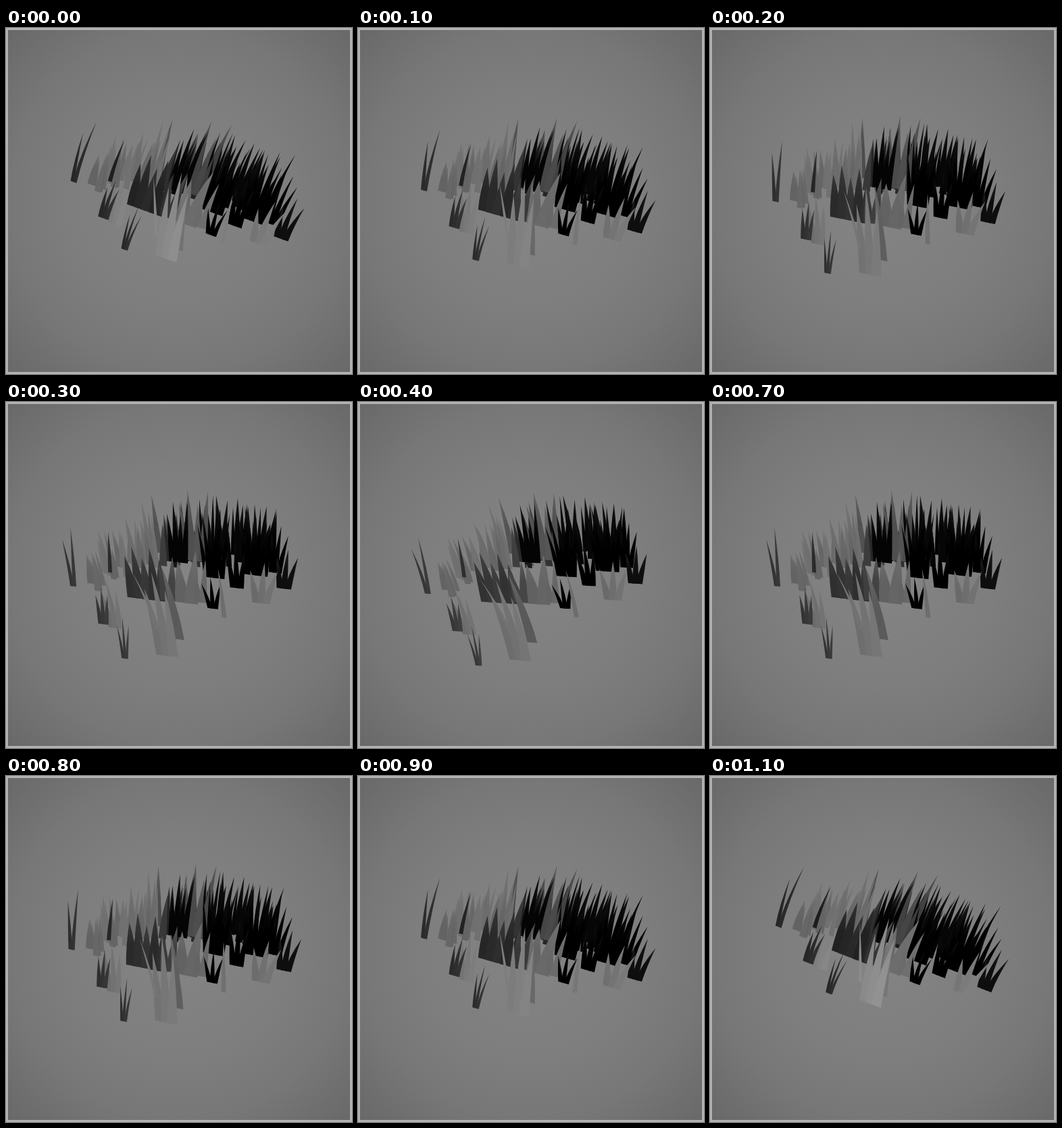
Recreate the animation shown at these times as an HTML page with a canvas. Size 512 by 512 pixels, loop 1220 ms.

```html
<!DOCTYPE html>
<html lang="en">
<head>
<meta charset="utf-8">
<title>Swaying grass</title>
<style>
html, body { margin: 0; width: 100%; height: 100%; overflow: hidden; background: #767676; }
canvas { display: block; width: 100vw; height: 100vh; }
</style>
</head>
<body>
<canvas id="stage" width="512" height="512"></canvas>
<script>
const ctx = document.getElementById('stage').getContext('2d');
const LOOP = 1220, STEP = 100, STEPS = 12;
const PIVOT = { x: 304, y: 308 };
const blades = [];

const clamp = (v, lo, hi) => Math.max(lo, Math.min(hi, v));
const mix = (a, b, t) => a + (b - a) * t;
const gray = v => { v = clamp(Math.round(v), 0, 255); return `rgb(${v},${v},${v})`; };

let seed = 4127;
const rnd = (lo = 0, hi = 1) => {
  seed = (seed * 16807) % 2147483647;
  return lo + (hi - lo) * seed / 2147483647;
};

// A fan of blades on a slightly sloping root; every second blade is tall
function clump(shade, x, y, w, h, n = 1, spread = 0, lean = 0) {
  for (let i = 0; i < n; i++) {
    const t = n > 1 ? 2 * i / (n - 1) - 1 : 0;
    const offset = t * w * 0.5 * (1 - 1 / n);
    blades.push({
      x: x + offset,
      y: y + offset * 0.2,
      w: n > 1 ? w / n * 1.6 : w,
      h: h * (n === 1 || i % 2 ? 1 : 0.8),
      lean: lean + t * spread,
      shade: shade + (shade > 15 ? (i % 3) * 4 : 0)
    });
  }
}

// Rear rows: pale on the left, mixed in the middle, black on the right
function meadow() {
  const rows = [];
  for (let i = 0; i < 64; i++) {
    const s = (i * 0.618) % 1;
    const x = mix(124, 396, s);
    const pale = rnd(98, 114);
    const shade = s < 0.36 ? pale : s < 0.6 ? rnd(0, 82) : rnd(0, 8);
    const y = 244 + 34 * (1 - s / 0.25) * (s < 0.25) + 20 * Math.max(0, s - 0.4) - rnd(0, 26);
    const h = (62 + 38 * Math.sin(Math.PI * Math.min(1, s * 0.9))) * rnd(0.55, 1);
    rows.push([shade, x, y, rnd(6, 13), h, 1, 0, mix(-0.04, 0.2, s) + rnd(-0.08, 0.08)]);
  }
  rows.sort((a, b) => a[2] - b[2]).forEach(r => clump(...r));
}

meadow();
clump(70, 278, 238, 32, 108, 4, 0.1, 0.1);
clump(4, 254, 238, 24, 92, 4, 0.08, 0.1);
clump(0, 307, 264, 28, 100, 6, 0.14, 0.1);
clump(0, 369, 266, 32, 104, 6, 0.15, 0.13);
clump(0, 398, 265, 16, 72, 3, 0.12, 0.24);
clump(0, 341, 281, 17, 70, 3, 0.14, 0.08);
clump(42, 208, 285, 54, 80, 5, 0.06, 0);
clump(58, 239, 289, 18, 68, 2, 0.1, 0.05);
clump(98, 266, 295, 26, 80, 2, 0.1, 0.12);
clump(100, 287, 296, 14, 66, 2, 0.1, 0.08);
clump(0, 305, 306, 13, 48, 3, 0.26, 0.05);
clump(112, 322, 320, 7, 75);
clump(14, 411, 288, 18, 60, 3, 0.2, 0.22);
clump(108, 377, 305, 22, 62, 3, 0.26, 0.2);
clump(38, 152, 243, 6, 62, 1, 0, 0.1);
clump(110, 160, 320, 17, 74, 3, 0.1, -0.05);
clump(46, 142, 313, 13, 56, 3, 0.1, 0.08);
clump(46, 174, 363, 8, 64, 3, 0.12, 0.08);
clump(46, 97, 257, 7, 90, 2, 0.07, 0.02);
clump(94, 255, 344, 15, 110, 1, 0, -0.1);
clump(114, 237, 365, 27, 128, 3, 0.06, -0.05);
clump(118, 222, 328, 5, 88, 1, 0, -0.28);

// Ground seen at an angle, turned by sway u in -1..1
function ground(x, y, u) {
  const X = x - PIVOT.x, Y = y - PIVOT.y;
  return [
    x + 2 * u - 0.03 * X * u * u,
    y - (0.2 * X - 0.18 * Y) * u + (0.02 * X - 0.05 * Y) * u * u
  ];
}

// Dark blades lighten with the sway, pale ones in front catch the light
function toneAt({ x, y, shade }, u) {
  if (shade < 15) return shade;
  if (shade < 90) return shade + 9 * u;
  const glow = clamp((y - PIVOT.y + 30) / 60, 0, 1);
  return shade + glow * (10 * u * u - 14 * u);
}

function drawBlade(b, u) {
  const [x, y] = ground(b.x, b.y, u);
  const left = ground(b.x - b.w / 2, b.y - b.w * 0.1, u);
  const right = ground(b.x + b.w / 2, b.y + b.w * 0.1, u);
  const bend = 0.25 - 0.0003 * (b.x - PIVOT.x);
  const dx = b.h * (b.lean - bend * u);
  const dy = -b.h * (1 - 0.04 * u - 0.05 * u * u);
  const tip = [x + dx, y + dy];
  const belly = side => [x + dx * 0.32 + side * b.w * 0.46, y + dy * 0.46];
  const tone = toneAt(b, u);
  const fill = ctx.createLinearGradient(x, y, ...tip);
  fill.addColorStop(0, gray(tone));
  fill.addColorStop(0.5, gray(tone));
  fill.addColorStop(1, gray(mix(tone, 122, b.shade < 60 ? 0.15 : 0.4)));
  ctx.fillStyle = fill;
  ctx.beginPath();
  ctx.moveTo(...left);
  ctx.quadraticCurveTo(...belly(-1), ...tip);
  ctx.quadraticCurveTo(...belly(1), ...right);
  ctx.closePath();
  ctx.fill();
}

const backdrop = ctx.createRadialGradient(256, 256, 0, 256, 256, 362);
backdrop.addColorStop(0, gray(132));
backdrop.addColorStop(0.45, gray(126));
backdrop.addColorStop(0.7, gray(119));
backdrop.addColorStop(1, gray(104));

function draw(now) {
  const step = Math.min(STEPS - 1, Math.floor((now % LOOP) / STEP));
  const u = Math.cos((step - 5) * Math.PI / 6);
  ctx.fillStyle = backdrop;
  ctx.fillRect(0, 0, 512, 512);
  for (const b of blades) drawBlade(b, u);
  ctx.strokeStyle = '#b1b4b2';
  ctx.lineWidth = 3;
  ctx.strokeRect(1.5, 1.5, 509, 509);
}

let start = null;
function tick(now) {
  if (start === null) start = now;
  draw(now - start);
  requestAnimationFrame(tick);
}
draw(0);
requestAnimationFrame(tick);
</script>
</body>
</html>
```
